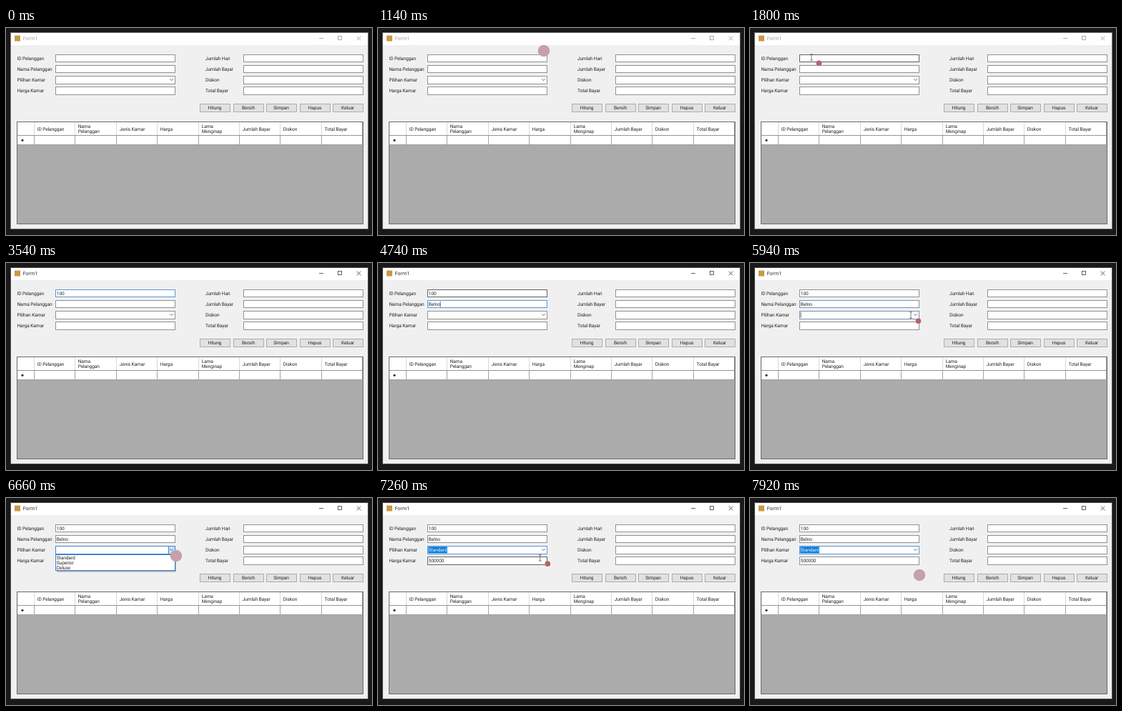
An HTML page with a canvas for the animation above (8000 ms loop, 512 by 290 pixels).

```html
<!DOCTYPE html>
<html lang="id">
<head>
<meta charset="utf-8">
<title>Form1</title>
<style>
html, body { margin: 0; width: 100%; height: 100%; overflow: hidden; background: #1b1819; }
canvas { display: block; width: 100vw; height: 100vh; }
</style>
</head>
<body>
<canvas id="stage"></canvas>
<script>
const W = 512, H = 290, LOOP = 8000, STEP = 60, BLINK = 540;
const UI = '6.6px Roboto, sans-serif';
const CAPTION = '6.9px "Open Sans", sans-serif';
const INK = '#262626', ACCENT = '#3f83d4';
const BLUE = [92, 148, 220], GREY = [145, 145, 145], HOVER = [98, 98, 98];
const canvas = document.getElementById('stage');
const ctx = canvas.getContext('2d');

const OPEN = 6360, CHOSEN = 7200, ACTIVE = 1920;
const ROOMS = ['Standard', 'Superior', 'Deluxe'];

const column = (labels, lx, x) => labels.map((label, i) =>
  ({ label, lx, x, y: 37.5 + i * 15, w: 167, h: i < 2 ? 10 : 11 }));
const fields = [
  ...column(['ID Pelanggan', 'Nama Pelanggan', 'Pilihan Kamar', 'Harga Kamar'], 15.5, 69.5),
  ...column(['Jumlah Hari', 'Jumlah Bayar', 'Diskon', 'Total Bayar'], 279, 332.5)
];
const [idBox, nameBox, roomBox, priceBox] = fields;

const focusSpans = [
  { box: idBox, from: ACTIVE, to: 3540 },
  { box: nameBox, from: 3540, to: 5880 },
  { box: roomBox, from: 5880, to: LOOP + 500 }
];

// Each edit sets a field's text and restarts the caret blink.
const edits = [
  [2040, idBox, ''], [2580, idBox, '1'], [2880, idBox, '10'], [3000, idBox, '100'],
  [3660, nameBox, ''], [4080, nameBox, 'B'], [4260, nameBox, 'Be'], [4440, nameBox, 'Bel'],
  [4680, nameBox, 'Beln'], [4740, nameBox, 'Belno'],
  [5940, roomBox, '']
];

// Pointer hot spot: time, x, y
const path = [
  [360, 482, 1], [480, 340, 14], [600, 226, 41], [780, 226, 41],
  [960, 225, 4], [1140, 223, 23], [1260, 196, 38], [1620, 86, 41],
  [5100, 86, 41], [5340, 176, 65], [5580, 242, 86], [5700, 242, 86],
  [5940, 225, 73], [6060, 226, 73], [6300, 232, 73], [6420, 229, 72],
  [6660, 229, 72], [6960, 226, 80], [7140, 226, 80],
  [7560, 230, 100], [7920, 228, 99]
];

const clamp = v => Math.max(0, Math.min(1, v));
const mix = (a, b, k) => a.map((v, i) => v + (b[i] - v) * k);
const rgb = c => `rgb(${c.map(Math.round).join(',')})`;

function pointerAt(t) {
  if (t < path[0][0]) return null;
  const i = path.findIndex(p => p[0] > t);
  if (i < 0) return path[path.length - 1].slice(1);
  const [t0, ...a] = path[i - 1], [t1, ...b] = path[i];
  const k = (t - t0) / (t1 - t0);
  return mix(a, b, k * k * (3 - 2 * k));
}

const inside = (p, b) => p && p[0] >= b.x && p[0] <= b.x + b.w && p[1] >= b.y && p[1] <= b.y + b.h;

function rect(x, y, w, h, fill, stroke, width = 1) {
  if (fill) { ctx.fillStyle = fill; ctx.fillRect(x, y, w, h); }
  if (stroke) { ctx.strokeStyle = stroke; ctx.lineWidth = width; ctx.strokeRect(x, y, w, h); }
}

function line(color, width, ...pts) {
  ctx.strokeStyle = color;
  ctx.lineWidth = width;
  ctx.beginPath();
  for (let i = 0; i < pts.length; i += 2) ctx.lineTo(pts[i], pts[i + 1]);
  ctx.stroke();
}

function dot(x, y, r, color) {
  ctx.fillStyle = color;
  ctx.beginPath();
  ctx.arc(x, y, r, 0, 7);
  ctx.fill();
}

function setFont(font) {
  ctx.font = font;
  ctx.letterSpacing = '-0.1px';
  ctx.textRendering = 'geometricPrecision';
}

function text(s, x, midY, color = INK, align = 'left', font = UI) {
  setFont(font);
  ctx.fillStyle = color;
  ctx.textAlign = align;
  ctx.fillText(s, x, midY + 2.4);
}

function textWidth(s) {
  setFont(UI);
  return ctx.measureText(s).width;
}

function drawWindow(t) {
  const on = clamp((t - ACTIVE + STEP) / 120);
  const ink = rgb(mix([150, 150, 150], [20, 20, 20], on));
  const icon = rgb(mix([150, 150, 150], [60, 60, 60], on));
  rect(0, 0, W, H, '#1b1819');
  rect(6.5, 6.5, 500, 275, '#f0f0f0');
  rect(6.5, 6.5, 500, 17.5, '#fff');
  rect(6.5, 6.5, 500, 275, null, rgb(mix([125, 125, 125], [85, 85, 85], on)));
  rect(12, 10.5, 8, 8, '#c99a45');
  text('Form1', 23.7, 14.7, ink, 'left', CAPTION);
  line(icon, 0.8, 438, 14.5, 444, 14.5);
  rect(464.5, 11.5, 5, 5, null, icon, 0.8);
  line(icon, 0.8, 490.7, 11.7, 496.3, 17.3);
  line(icon, 0.8, 496.3, 11.7, 490.7, 17.3);
}

function drawButtons() {
  ['Hitung', 'Bersih', 'Simpan', 'Hapus', 'Keluar'].forEach((s, i) => {
    const x = 271.5 + Math.round(i * 46.5);
    rect(x, 106.5, 42, 11, '#e1e1e1', '#adadad');
    text(s, x + 20.5, 112, INK, 'center');
  });
}

function drawGrid() {
  rect(15.5, 131.5, 484, 143, '#ababab', '#6a6a6a');
  rect(16, 132, 482.5, 31.5, '#fff');
  const heads = ['ID Pelanggan', 'Nama|Pelanggan', 'Jenis Kamar', 'Harga',
    'Lama|Menginap', 'Jumlah Bayar', 'Diskon', 'Total Bayar'];
  heads.forEach((s, i) => {
    const x = 39.5 + Math.round(i * 57.4), rows = s.split('|');
    line('#d8d8d8', 1, x, 132, x, 150);
    line('#a2a2a2', 1, x, 150, x, 163);
    rows.forEach((r, n) => text(r, x + 4.2, 141.3 + (n - (rows.length - 1) / 2) * 7.5));
  });
  line('#a2a2a2', 1, 498.5, 132, 498.5, 163);
  line('#959595', 1, 16, 150.5, 499, 150.5);
  line('#a2a2a2', 1, 16, 163.5, 499, 163.5);
  dot(23, 157.3, 1.6, '#333');
}

function borderOf(box, t, p) {
  let c = box !== roomBox && inside(p, box) ? HOVER : GREY;
  for (const f of focusSpans) {
    if (f.box !== box) continue;
    const k = Math.min(clamp((t - f.from) / 120), 1 - clamp((t - f.to) / 120));
    c = mix(c, BLUE, k);
  }
  return rgb(c);
}

const fieldText = (b, s, color) => text(s, b.x + 1.3, b.y + 5, color);

function drawFields(t, p) {
  for (const b of fields) {
    text(b.label, b.lx, b.y + 5);
    rect(b.x, b.y, b.w, b.h, '#fff', borderOf(b, t, p));
  }

  const isOpen = t >= OPEN && t < CHOSEN;
  if (isOpen) {
    rect(roomBox.x, roomBox.y, roomBox.w, roomBox.h, null, ACCENT);
    rect(227.5, roomBox.y, 9, roomBox.h, '#cce4f7', ACCENT);
  }
  line('#555', 0.9, 229.2, 71.4, 231.4, 73.6, 233.6, 71.4);

  const done = edits.filter(e => e[0] <= t);
  for (const b of [idBox, nameBox]) {
    const last = done.filter(e => e[1] === b).pop();
    if (last) fieldText(b, last[2]);
  }

  const last = done[done.length - 1];
  if (last && t < OPEN) {
    const [at, b, s] = last;
    if (Math.floor((t - at) / BLINK) % 2 === 0) {
      const x = b.x + 1.6 + textWidth(s);
      line('#333', 0.7, x, b.y + 1.2, x, b.y + 9.2);
    }
  }

  if (t >= CHOSEN) {
    rect(70.3, 68.3, textWidth(ROOMS[0]) + 1, 9, '#0078d7');
    fieldText(roomBox, ROOMS[0], '#fff');
    fieldText(priceBox, '500000');
  }
  if (isOpen) drawList(p);
}

function drawList(p) {
  rect(71, 81, 167, 22.5, 'rgba(0,0,0,.3)');
  rect(69.5, 79.5, 167, 22, '#fff', ACCENT);
  ROOMS.forEach((s, i) => {
    const y = 79.5 + i * 7.3;
    const hot = p && p[1] >= y - 1 && p[1] < y + 6.3;
    if (hot) rect(70, y, 166, 7.3, '#0078d7');
    text(s, 70.8, y + 3.6, hot ? '#fff' : INK);
  });
}

function drawPointer(t, p) {
  if (!p || (t >= 2580 && t < 5160)) return;
  const [x, y] = p;
  const overText = fields.some(b => inside(p, b)) && !(inside(p, roomBox) && x > 227);
  if (!overText) return dot(x + 9, y + 9, 8.3, '#c6a0ab');
  line('#444', 0.7, x, y - 4, x, y + 4);
  for (const end of [-4.2, 4.2]) line('#444', 0.7, x - 2, y + end, x + 2, y + end);
  dot(x + 10.5, y + 8.2, 3.8, '#b5626b');
}

function frame(now) {
  const t = Math.floor((now % LOOP) / STEP) * STEP;
  const dpr = window.devicePixelRatio || 1;
  const w = Math.round(innerWidth * dpr), h = Math.round(innerHeight * dpr);
  if (canvas.width !== w || canvas.height !== h) { canvas.width = w; canvas.height = h; }
  ctx.setTransform(w / W, 0, 0, h / H, 0, 0);
  const p = pointerAt(t);
  drawWindow(t);
  drawButtons();
  drawGrid();
  drawFields(t, p);
  drawPointer(t, p);
}

const start = performance.now();
function tick() {
  frame(performance.now() - start);
  requestAnimationFrame(tick);
}
tick();
</script>
</body>
</html>
```
